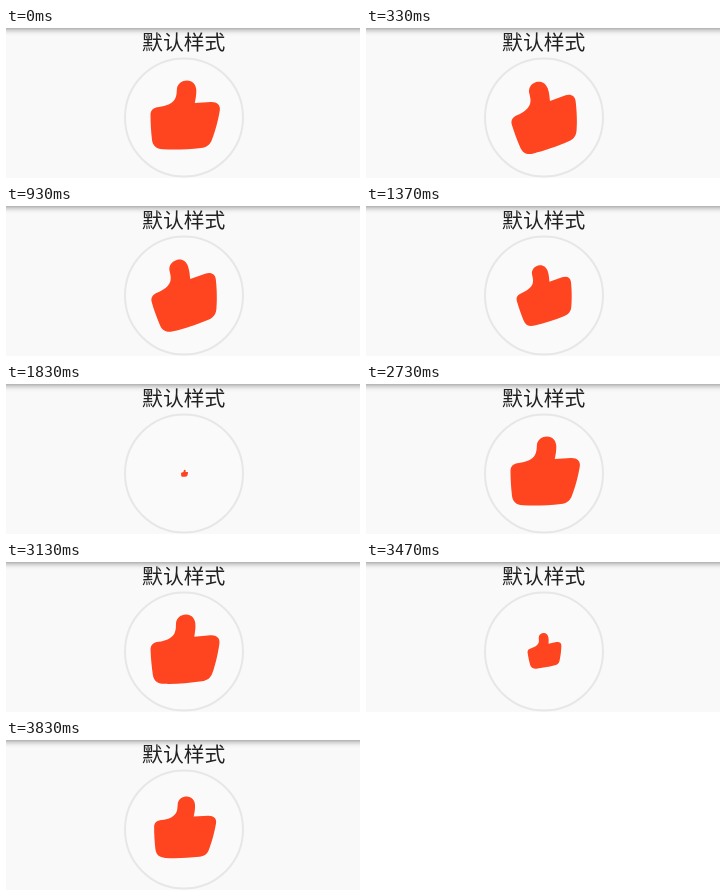
Write an HTML page that moves like this. It is 354 px wide and 150 px high and loops after 3.91 s.

```html
<!DOCTYPE html>
<html lang="zh-CN">
<head>
<meta charset="utf-8">
<title>默认样式</title>
<style>
  html, body { margin: 0; width: 100%; height: 100%; overflow: hidden; background: #f9f9f9; }
  svg { display: block; width: 354px; height: 150px; }
  text { font: 20.8px "Noto Sans CJK SC", "Noto Sans CJK", sans-serif; fill: #222; text-anchor: middle; }
</style>
</head>
<body>
<svg viewBox="0 0 354 150">
  <defs>
    <linearGradient id="shade" x2="0" y2="1">
      <stop offset="0" stop-color="#b0b0b0"/>
      <stop offset=".3" stop-color="#d4d4d4"/>
      <stop offset=".65" stop-color="#f0f0f0"/>
      <stop offset="1" stop-color="#f9f9f9"/>
    </linearGradient>
  </defs>
  <rect width="354" height="150" fill="#f9f9f9"/>
  <rect width="354" height="8" fill="url(#shade)"/>
  <text x="177.7" y="22.3">默认样式</text>
  <circle cx="178" cy="89.5" r="59" fill="#fafafa" stroke="#e7e7e7" stroke-width="2"/>
  <path id="thumb" fill="#ff4420" d="M153 79C160 78 166 76 169 71C171 67.5 170.5 64 171 60C172 55.5 176 52.5 181 52.5C186.5 52.5 190 56.5 190.3 62C190.5 67 189.5 71 188.8 75L205 74C211 73.8 214.8 77 213.8 82.5C212 93 209 104 206 111.5C204 117 200.5 119.3 195 120C182 121.5 168 122 157 121.3C150 121 146.8 117.5 146 112C145 103 144.5 95 144.5 87C144.5 82 147.5 79.5 153 79Z"/>
</svg>
<script>
  const LOOP = 3910, BEAT = 533.3;
  const CX = 178.5, CY = 89.5;
  const thumb = document.getElementById('thumb');

  // [time in ms, value]
  const scaleKeys = [[0, 1], [65, 1], [99, .89], [160, 0], [218, 0], [231, .1], [320, .98], [400, .98], [480, 1], [BEAT, 1]];
  const angleKeys = [[0, 0], [225, 0], [320, -17], [385, -17], [485, 0], [BEAT, 0]];

  const smooth = u => u * u * (3 - 2 * u);

  function sample(keys, t, ease) {
    const i = keys.findIndex(k => k[0] > t);
    const [t0, a] = keys[i - 1], [t1, b] = keys[i];
    return a + (b - a) * ease((t - t0) / (t1 - t0));
  }

  const start = performance.now();

  function draw() {
    const t = (performance.now() - start) % LOOP % BEAT;
    const scale = sample(scaleKeys, t, u => u);
    const angle = sample(angleKeys, t, smooth);
    thumb.setAttribute('transform',
      `translate(${CX} ${CY}) rotate(${angle}) scale(${scale}) translate(${-CX} ${-CY})`);
    requestAnimationFrame(draw);
  }
  draw();
</script>
</body>
</html>
```
